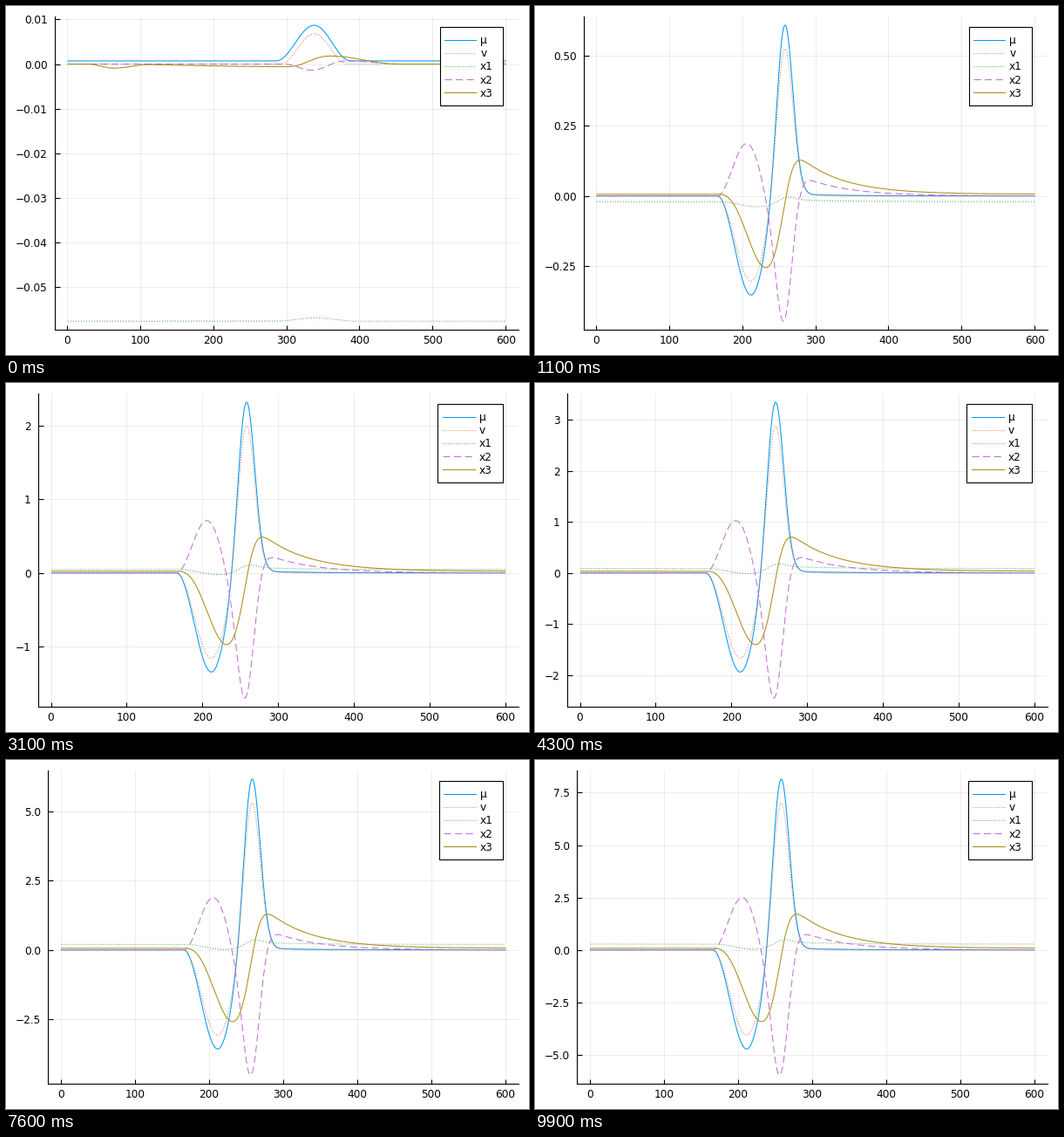
Recreate the animation shown at these times as a matplotlib script. Size 600x400 px, loop 10000 ms.

```python
import math

import matplotlib.pyplot as plt
import numpy as np
from matplotlib.animation import FuncAnimation
from matplotlib.patches import Rectangle

W, H = 600, 400
PX = 0.72  # points per pixel at 100 dpi
FRAMES = 100
RIGHT, TOP, BOTTOM = 588.2, 11.9, 371.4
ONSET = 3.9  # the drive changes sign here
LINE, AXIS = 1.05 * PX, 1.1 * PX

plt.rcParams.update({
    "font.family": "DejaVu Sans",
    "font.size": 12.1 * PX,
    "lines.scale_dashes": False,
})

X = np.arange(1, 601)
NICE = [(1, 1.0), (5, 0.9), (2, 0.7), (2.5, 0.5), (3, 0.2)]
DOT = (0, (.95 * PX, 2.05 * PX))
DASH = (0, (8.2 * PX, 4.3 * PX))
SERIES = [
    ("μ", "#009AFA", "-"),
    ("v", "#E36F47", DOT),
    ("x1", "#3EA44E", DOT),
    ("x2", "#C371D2", DASH),
    ("x3", "#AC8E18", "-"),
]


def hump(center, left, right):
    """Raised cosine with its own reach on each side."""
    d = X - center
    u = np.clip(d / np.where(d < 0, left, right), -1, 1)
    return np.cos(u * np.pi / 2) ** 2


def leaky_sum(inflow, tau):
    out, level = [], 0.0
    for value in inflow:
        level += value - level / tau
        out.append(level)
    return np.array(out)


def strong_response():
    """Dip, then a sharp peak; the states follow by leaky integration."""
    dip = .58 * hump(212, 46, 43)
    peak = np.exp(-.5 * ((X - 258.5) / 10.8) ** 2)
    store = leaky_sum(.02305 * peak - .0272 * dip, 60)
    mu = peak - dip + .04 * np.clip(store, 0, None)
    x1 = .025 * mu + .045 * store
    x2 = .78 * dip - .693 * peak + .55 * store
    return np.array([mu, .86 * mu, x1, x2, store + .01])


def weak_response():
    """Small late bump seen while the drive is negative."""
    mu = .0007 + .008 * hump(338, 52, 50)
    v = .0068 * hump(338, 46, 46)
    x1 = .00075 * hump(340, 55, 55)
    x2 = .0007 * hump(382, 30, 75) - .0014 * hump(335, 38, 35)
    x3 = (.0018 * hump(360, 55, 92) - .0009 * hump(63, 35, 50)
          - .0006 * hump(300, 270, 50))
    return np.array([mu, v, x1, x2, x3])


STRONG, WEAK = strong_response(), weak_response()


def signals(k):
    drive = k - ONSET
    y = .0857 * drive * STRONG if drive > 0 else -drive / ONSET * WEAK
    y[2] += -.0577 + .0034 * k
    return y


def pick_ticks(lo, hi):
    """Choose the best scored step with 4 to 8 ticks; also give decimals."""
    span = hi - lo
    z0 = math.floor(math.log10(span))
    best = (-1, None, 0)
    for z in range(z0 + 1, z0 - 3, -1):
        for q, nice in NICE:
            step = q * 10.0 ** z
            a, b = math.ceil(lo / step), math.floor(hi / step)
            n = b - a + 1
            if not 4 <= n <= 8:
                continue
            grain = 1 - abs(n - 5) / 5
            score = grain / 4 + .5 * span / ((n - 1) * step) + nice / 4
            if score > best[0]:
                ticks = [i * step for i in range(a, b + 1)]
                best = (score, ticks, max(0, (q == 2.5) - z))
    return best[1:]


fig = plt.figure(figsize=(W / 100, H / 100), dpi=100, facecolor="white")
ax = fig.add_axes([.1, .1, .8, .8])
ax.set_xlim(1 - .03 * 599, 600 + .03 * 599)
ax.set_xticks(range(0, 601, 100))
ax.set_axisbelow(True)
ax.grid(color="black", alpha=.1, linewidth=.7 * PX)
ax.spines[["top", "right"]].set_visible(False)
ax.spines[["left", "bottom"]].set_linewidth(AXIS)
ax.tick_params(direction="in", length=5.5 * PX, width=AXIS)
ax.tick_params(axis="x", pad=5.9 * PX)
ax.tick_params(axis="y", pad=8 * PX)

over = fig.add_axes([0, 0, 1, 1])
over.set_xlim(0, W)
over.set_ylim(H, 0)
over.axis("off")
ROW = 15.12
BOX_TOP = 23.5
box = over.add_patch(Rectangle((0, BOX_TOP), 1, 6 * ROW, facecolor="white",
                               edgecolor="black", linewidth=AXIS))

lines, samples, names = [], [], []
for n, (name, color, dash) in enumerate(SERIES):
    style = dict(color=color, linestyle=dash, linewidth=LINE,
                 dash_capstyle="butt")
    y = BOX_TOP + (n + 1) * ROW
    lines += ax.plot(X, 0 * X, clip_on=False, **style)
    samples += over.plot([0, 1], [y, y], **style)
    names.append(over.text(0, y + 4.6, name, va="baseline"))


def place_legend(width):
    right = RIGHT - width / 30
    left = right - .113 * width - 12.2
    box.set_x(left)
    box.set_width(right - left)
    for sample, name in zip(samples, names):
        sample.set_xdata([left + .01 * width, left + .077 * width])
        name.set_x(left + .0865 * width)


def draw(k):
    data = signals(k)
    lo, hi = data.min(), data.max()
    pad = .03 * (hi - lo)
    lo, hi = lo - pad, hi + pad
    ticks, digits = pick_ticks(lo, hi)
    left = 36.8 + (11.4 + 7.7 * (digits - 1) if digits else 0)
    width = RIGHT - left
    ax.set_position([left / W, 1 - BOTTOM / H, width / W, (BOTTOM - TOP) / H])
    ax.set_yticks(ticks, [f"{t:.{digits}f}".replace("-", "−") for t in ticks])
    ax.set_ylim(lo, hi)
    for line, y in zip(lines, data):
        line.set_ydata(y)
    place_legend(width)
    return lines


anim = FuncAnimation(fig, draw, frames=FRAMES, interval=100, repeat=True,
                     repeat_delay=0, blit=False)
plt.show()
```
